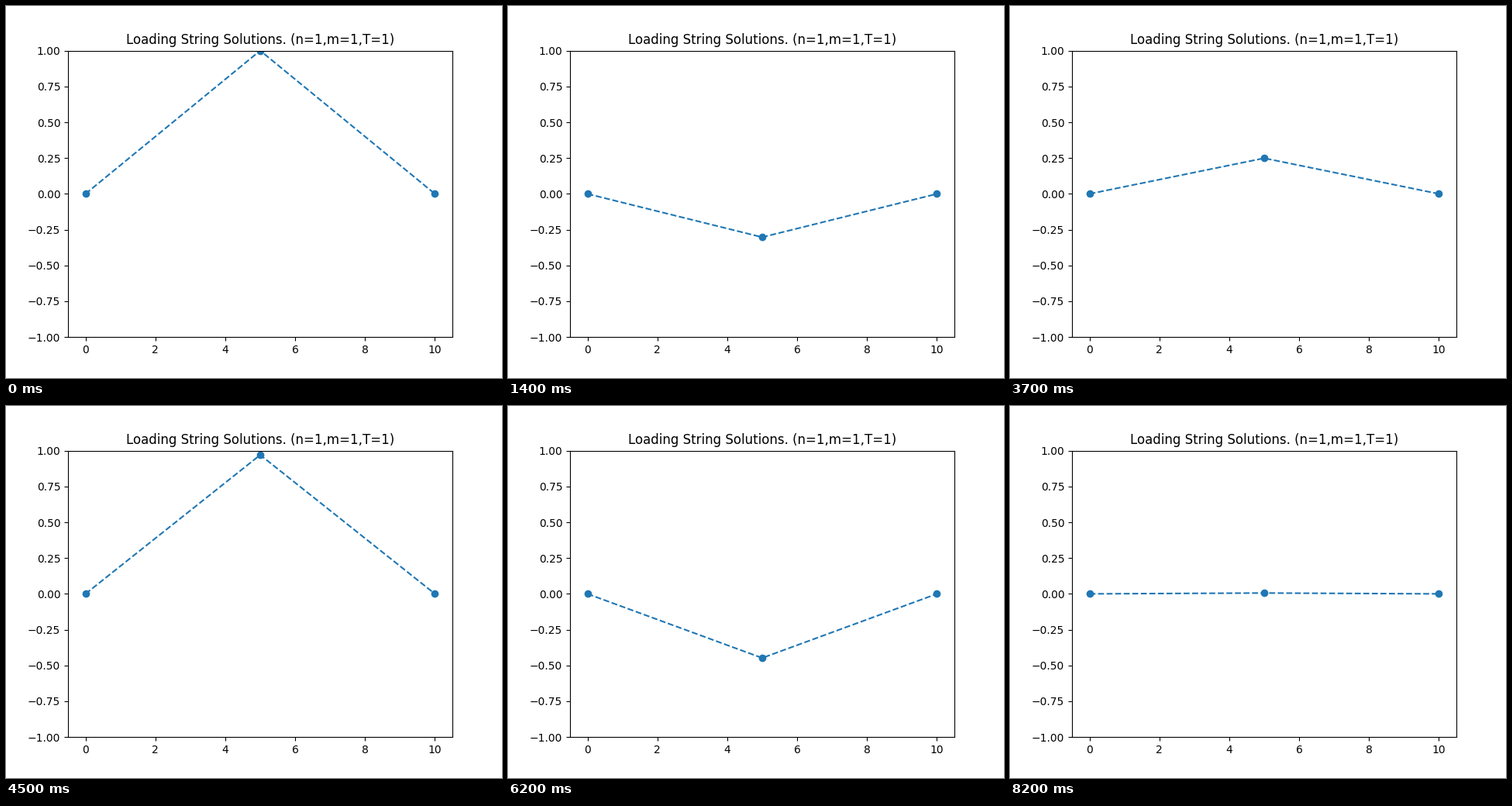
Recreate the animation shown at these times as a matplotlib script. Size 640 px wide and 480 px high, loop 8.3 s.

```python
import numpy as np
import matplotlib.pyplot as plt
from matplotlib.animation import FuncAnimation

FRAMES = 83
INTERVAL = 100  # ms per frame
TIME_STEP = 0.3
OMEGA = np.sqrt(0.2)  # angular frequency of the single mass

fig, ax = plt.subplots(figsize=(6.4, 4.8), dpi=100)
x = np.array([0, 5, 10])
string, = ax.plot(x, [0, 1, 0], "o--", color="C0")
ax.set_xlim(-0.5, 10.5)
ax.set_ylim(-1, 1)
ax.set_title("Loading String Solutions. (n=1,m=1,T=1)")


def update(frame):
    height = np.cos(OMEGA * TIME_STEP * frame)
    string.set_ydata([0, height, 0])
    return string,


anim = FuncAnimation(fig, update, frames=FRAMES, interval=INTERVAL,
                     repeat=True, repeat_delay=0)
plt.show()
```
